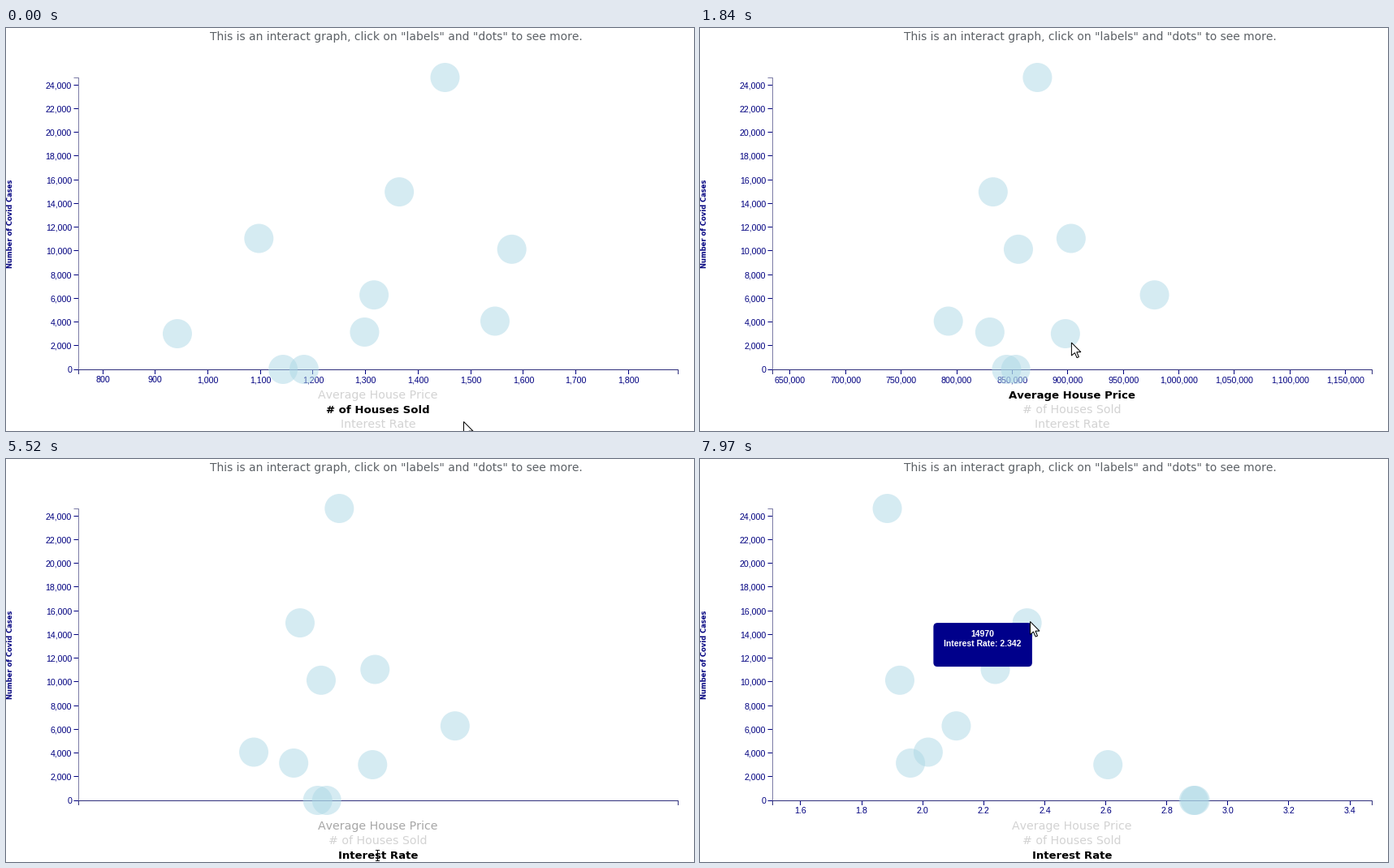
Write a matplotlib script that moves like this. It is 847 px wide and 497 px high and loops after 8000 ms.

```python
import numpy as np
import matplotlib.pyplot as plt
from matplotlib.animation import FuncAnimation
from matplotlib.patches import Circle, FancyBboxPatch, Polygon

W, H, DPI = 847, 497, 64
PT = 72 / DPI  # points per pixel
STEP, LOOP = 40, 8000
LEFT, RIGHT, TOP, BASE = 89, 827, 61, 421
RADIUS = 18
NAVY = "#000080"
IDLE, HOVER, FADE = 211, 125, 240
LAG, DWELL = 80, 160

# Monthly observations
CASES = np.array([24620, 14970, 11045, 10133, 6280, 4069, 3146, 3009, 0, 0])
PRICE = np.array([872.6, 832.7, 902.9, 855.467, 978, 792.4, 829.8, 897.8, 844.8, 853.1]) * 1000
SOLD = np.array([1451, 1364, 1097, 1578, 1316, 1546, 1298, 942, 1143, 1183])
RATE = np.array([1.884, 2.342, 2.238, 1.925, 2.11, 2.018, 1.96, 2.607, 2.888, 2.893])

plt.rcParams["text.kerning_factor"] = 6
fig = plt.figure(figsize=(W / DPI, H / DPI), dpi=DPI, facecolor="white")
ax = fig.add_axes([0, 0, 1, 1])
ax.set_xlim(0, W)
ax.set_ylim(H, 0)
ax.axis("off")


def text(x, y, s, px, font="DejaVu Sans", **kw):
    kw = {"ha": "center", "va": "baseline", **kw}
    return ax.text(x, y, s, fontsize=px * PT, family=font, **kw)


def line(xs, ys, color=NAVY):
    return ax.plot(xs, ys, color=color, lw=PT, solid_capstyle="butt", snap=False)[0]


def ease(u):
    u = np.clip(u, 0, 1)
    return 4 * u**3 if u < 0.5 else 1 - 4 * (1 - u) ** 3


class Measure:
    """One choice for the x axis: a scale padded by 20 %, its ticks and its caption."""

    def __init__(self, row, data, caption, tip, step, fmt):
        self.data, self.tip, self.fmt = data, tip, fmt
        self.lo, self.hi = 0.8 * data.min(), 1.2 * data.max()
        self.y = 452 + 18 * row
        self.label = text(458, self.y + 5, caption, 14)
        self.ticks = []
        for v in np.arange(np.ceil(self.lo / step), self.hi / step) * step:
            mark = line([0, 0], [BASE + 0.5, BASE + 6])
            name = text(0, BASE + 16.2, format(v, fmt), 10.6, "Liberation Sans", color=NAVY)
            self.ticks.append((v, mark, name))

    def px(self, v):
        return LEFT + (v - self.lo) / (self.hi - self.lo) * (RIGHT - LEFT)

    def hit(self, pos):
        return abs(pos[0] - 458) < 75 and abs(pos[1] - self.y) < 9


price = Measure(0, PRICE, "Average House Price", "House Price", 50000, ",.0f")
sold = Measure(1, SOLD, "# of Houses Sold", "Houses Sold", 100, ",.0f")
rate = Measure(2, RATE, "Interest Rate", "Interest Rate", 0.2, ".1f")
MEASURES = (price, sold, rate)
CLICKS = [(750, sold, price), (5330, price, rate)]
DURATION = 1000

# Title and fixed axes
text(480.6, 14.8, 'This is an interact graph, click on "labels" and "dots" to see more.',
     13.93, color="#5c6166")
text(8.3, 241, "Number of Covid Cases", 8.43, weight="bold", color=NAVY,
     rotation=90, rotation_mode="anchor")
line([LEFT - 5.5, LEFT + 0.5, LEFT + 0.5], [TOP + 0.5, TOP + 0.5, BASE], "#7c7ca6")
line([LEFT + 0.5, LEFT + 0.5, RIGHT + 0.5, RIGHT + 0.5],
     [BASE + 6, BASE + 0.5, BASE + 0.5, BASE + 6], "#30307c")


def case_y(n):
    return BASE - n / CASES.max() * (BASE - TOP)


for n in range(0, 25000, 2000):
    y = np.floor(case_y(n)) + 0.5
    line([LEFT - 5.5, LEFT], [y, y])
    text(LEFT - 8, y + 3.6, f"{n:,}", 10.6, "Liberation Sans", color=NAVY, ha="right")

dots = [ax.add_patch(Circle((0, case_y(n)), RADIUS, fc="lightblue", ec="none",
                            alpha=0.5, zorder=4)) for n in CASES]

tip_box = ax.add_patch(FancyBboxPatch((0, 0), 121.5, 54, fc="darkblue", ec="none", zorder=6,
                                      boxstyle="round,pad=0,rounding_size=5"))
tip_rows = [text(0, 0, "", 10.4, "Liberation Sans", weight="bold", color="white", zorder=7)
            for _ in range(2)]

# Pointer stops: arrival, departure, x, y
STOPS = np.array([
    (0, 80, 563.5, 485.5), (540, 1580, 490.5, 452.5), (2310, 3090, 397.5, 271.5),
    (3560, 4110, 452.5, 256.5), (4500, 4500, 477.5, 405.5), (4890, 4960, 504, 474),
    (5190, 5980, 457.5, 488.5), (6200, 6200, 408, 450), (6870, 7430, 368.5, 262.5),
    (7740, LOOP, 406.5, 200.5),
])
SHAPES = {
    "arrow": [(0, 0), (0, 16), (4, 12.5), (6.7, 18.6), (9, 17.6), (6.4, 11.6), (11.5, 11.6)],
    "beam": [(-2.5, -6), (2.5, -6), (0, -6), (0, 7), (-2.5, 7), (2.5, 7)],
    "hand": [(-2.5, -2), (0.5, -2), (1.5, 5), (9, 8), (9, 13.5), (6.5, 20), (-2, 20),
             (-7, 11), (-3.5, 12)],
}
pointers = {
    kind: ax.add_patch(Polygon(pts, closed=kind != "beam", fill=kind != "beam", fc="white",
                               ec="black", lw=PT, joinstyle="miter", snap=False, zorder=9))
    for kind, pts in SHAPES.items()
}


def pointer_at(t):
    times = STOPS[:, :2].ravel()
    return np.array([np.interp(t, times, STOPS[:, c].repeat(2)) for c in (2, 3)])


def dot_at(pos):
    gaps = [np.hypot(*(pos - d.center)) for d in dots]
    best = int(np.argmin(gaps))
    return best if gaps[best] < RADIUS else None


def draw_chart(t):
    """Place dots, ticks and captions; return the chosen measure."""
    old = new = sold
    p, since = 1, LOOP
    for start, a, b in CLICKS:
        if t >= start:
            old, new, since = a, b, t - start
            p = ease(since / DURATION)

    def blend(from_old, from_new):
        return (1 - p) * from_old + p * from_new

    for i, dot in enumerate(dots):
        dot.center = blend(old.px(old.data[i]), new.px(new.data[i])), dot.center[1]
    before = pointer_at(t - LAG)
    for m in MEASURES:
        alpha = p if m is new else 1 - p if m is old else 0
        for v, mark, name in m.ticks:
            x = blend(old.px(v), new.px(v))
            shown = alpha > 0.005 and -40 < x < W + 40
            for art in (mark, name):
                art.set_visible(shown)
                art.set_alpha(alpha)
            if shown:
                mark.set_xdata([np.floor(x) + 0.5] * 2)
                name.set_x(x)
        level = IDLE
        if m is new:
            level = 0
        elif m.hit(before):
            level = HOVER
        elif m is old:
            level = IDLE * min(since / FADE, 1)
        m.label.set_color((level / 255,) * 3)
        m.label.set_weight("bold" if m is new else "normal")
        m.label.set_fontsize((13.25 if m is new else 14.1) * PT)
    return new


def draw_tip(t, measure):
    i = dot_at(pointer_at(t))
    shown = i is not None and i == dot_at(pointer_at(t - DWELL))
    for art in (tip_box, *tip_rows):
        art.set_visible(shown)
    if shown:
        x, y = dots[i].center
        tip_box.set_x(x - 115.25)
        tip_box.set_y(y)
        rows = f"{CASES[i]}", f"{measure.tip}: {measure.data[i]:.7g}"
        for k, (art, row) in enumerate(zip(tip_rows, rows)):
            art.set_text(row)
            art.set_position((x - 54.5, y + 17 + 12 * k))


def draw_pointer(t):
    pos = pointer_at(t)
    current = "arrow"
    if any(m.hit(pos) for m in MEASURES):
        resting = np.allclose(pos, pointer_at(t - STEP))
        current = "beam" if resting else "hand"
    for kind, art in pointers.items():
        art.set_visible(kind == current)
        art.set_xy(pos + SHAPES[kind])


def update(i):
    t = i * STEP
    draw_tip(t, draw_chart(t))
    draw_pointer(t)
    return []


anim = FuncAnimation(fig, update, frames=LOOP // STEP, interval=STEP, repeat=True,
                     repeat_delay=0, blit=False)
plt.show()
```
